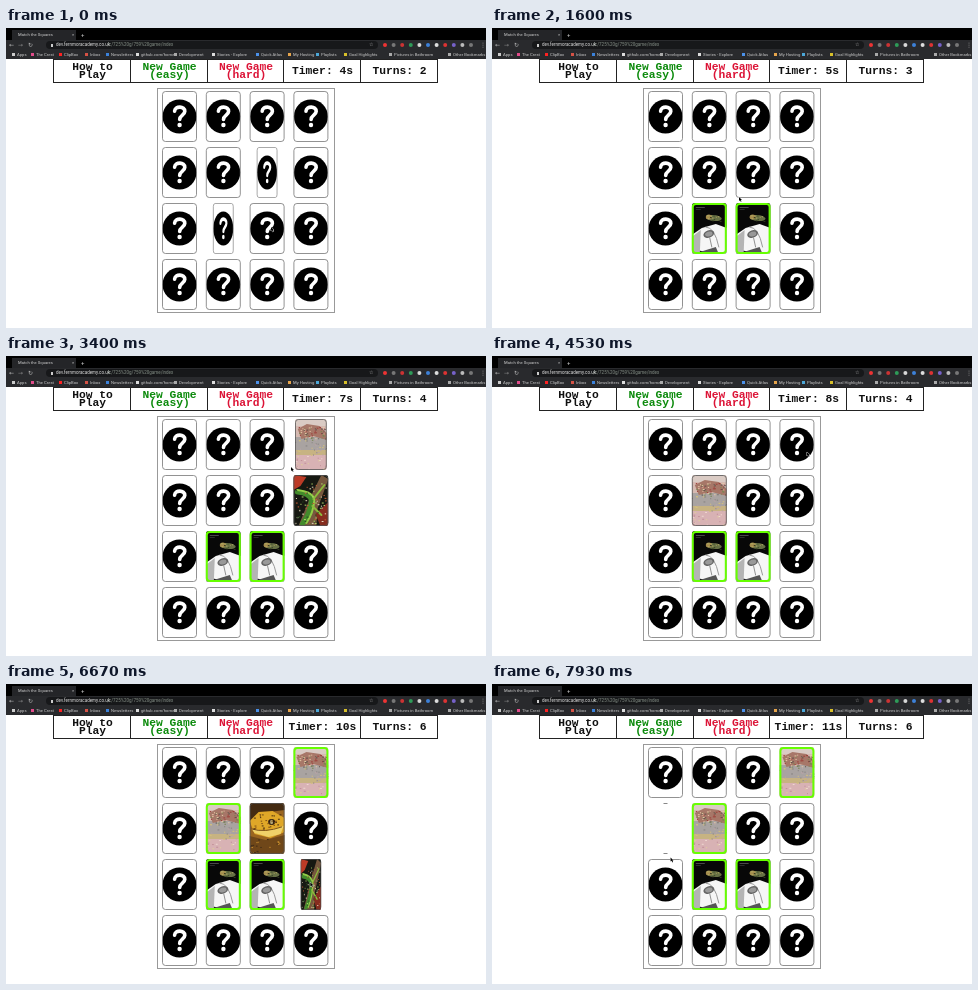
An HTML page with a canvas for the animation above (8 s loop, 480 by 300 pixels).

```html
<!DOCTYPE html>
<html lang="en">
<head>
<meta charset="utf-8">
<title>Match the Squares</title>
<style>
  html, body { margin: 0; width: 100%; height: 100%; overflow: hidden; background: #fff; }
  canvas { display: block; width: 480px; height: 300px; }
</style>
</head>
<body>
<canvas id="stage" width="480" height="300"></canvas>
<script>
const ctx = document.getElementById('stage').getContext('2d');
const LOOP = 8000, FLIP = 500;
const CARD_W = 35, CARD_H = 51;

// ---------- drawing helpers ----------
function rect(x, y, w, h, color) {
  ctx.fillStyle = color;
  ctx.fillRect(x, y, w, h);
}
function shape(color, ...points) {
  ctx.fillStyle = color;
  ctx.beginPath();
  points.forEach(([x, y]) => ctx.lineTo(x, y));
  ctx.fill();
}
function oval(x, y, rx, ry, color, turn = 0) {
  ctx.fillStyle = color;
  ctx.beginPath();
  ctx.ellipse(x, y, rx, ry, turn, 0, Math.PI * 2);
  ctx.fill();
}
function curve(color, width, path) {
  ctx.strokeStyle = color;
  ctx.lineWidth = width;
  ctx.lineCap = 'round';
  ctx.stroke(new Path2D(path));
}
function rounded(x, y, w, h, r) {
  ctx.beginPath();
  ctx.roundRect(x, y, w, h, r);
}
function text(string, x, y, font, color, align = 'left') {
  ctx.font = font;
  ctx.fillStyle = color;
  ctx.textAlign = align;
  ctx.textBaseline = 'middle';
  ctx.fillText(string, x, y);
}
function speckle(seed, count, x, y, w, h, colors) {
  const random = () => (seed = (seed * 16807) % 2147483647) / 2147483647;
  for (let i = 0; i < count; i++) {
    rect(x + random() * w, y + random() * h, 1 + random(), 1, colors[i % colors.length]);
  }
}

// ---------- card faces, in a 35 x 51 box ----------
const faces = {
  mono() {
    rect(0, 0, 35, 51, '#080808');
    shape('#f6f6f6', [0, 32], [10, 25], [24, 21], [35, 25], [35, 51], [24, 51], [0, 46]);
    shape('#b4b4b4', [0, 34], [9, 27], [8, 51], [0, 51]);
    shape('#555', [8, 49], [24, 44], [27, 51], [6, 51]);
    curve('#999', 1, 'M14 24Q23 24 27 44');
    oval(17, 31, 5.5, 3.7, '#666', -.3);
    oval(17, 31, 3.8, 2.3, '#999', -.3);
    curve('#777', .8, 'M18 35L20 44');
    oval(22, 15, 8, 3, '#667044', .1);
    oval(17, 14, 3, 2.5, '#a58b4c');
    speckle(8, 14, 15, 12, 14, 6, ['#b0aa65', '#333c20']);
    rect(4, 4, 9, .7, '#666');
    rect(4, 6, 5, .6, '#444');
  },
  sand() {
    rect(0, 0, 35, 51, '#d5b9b1');
    rect(0, 0, 35, 7, '#dacbc4');
    rect(0, 18, 35, 13, '#a9a3a1');
    rect(0, 31, 35, 5, '#c7b382');
    rect(0, 36, 35, 15, '#d8b2b4');
    shape('#a77768', [3, 10], [13, 5], [27, 7], [35, 14], [35, 21], [20, 17], [7, 20]);
    speckle(31, 60, 4, 7, 30, 14, ['#9d3d38', '#788652', '#e5c7a7', '#5c5148']);
    speckle(77, 36, 0, 21, 35, 15, ['#85817f', '#d4c07c', '#bba5a8']);
    speckle(19, 24, 0, 37, 35, 14, ['#efd8d0', '#c18e98', '#dfcc9c']);
  },
  branch() {
    rect(0, 0, 35, 51, '#171912');
    shape('#76583e', [5, 51], [17, 22], [28, 0], [35, 4], [24, 34], [23, 51]);
    shape('#bc3b26', [0, 0], [13, 2], [7, 11], [0, 15]);
    shape('#862d1f', [22, 39], [35, 27], [35, 51], [27, 51]);
    curve('#438b2c', 5, 'M4 17Q17 18 18 26Q17 38 9 49');
    curve('#91cd47', 2, 'M4 15Q20 17 21 25Q20 38 13 48');
    curve('#8bbb3b', 2, 'M20 24L31 10M19 31L28 40');
    speckle(53, 65, 2, 8, 31, 41, ['#e6d8bd', '#c45b32', '#294d20', '#afd469']);
  },
  gecko() {
    rect(0, 0, 35, 51, '#9a6520');
    shape('#442b12', [0, 0], [35, 0], [35, 7], [12, 10], [0, 21]);
    shape('#6f4719', [0, 33], [16, 37], [35, 32], [35, 51], [0, 51]);
    shape('#dfa728', [0, 18], [9, 9], [23, 8], [35, 15], [35, 29], [21, 35], [5, 31]);
    shape('#efd169', [2, 26], [17, 28], [34, 23], [31, 31], [19, 34], [5, 30]);
    oval(22, 19, 3.5, 3, '#31200f');
    oval(22, 19, 1.5, 2.2, '#b6a773');
    curve('#7b511b', 1, 'M2 26Q15 30 32 24');
    speckle(91, 30, 4, 10, 29, 16, ['#4a3010', '#7c4d16']);
    speckle(44, 25, 0, 36, 35, 15, ['#c28a2c', '#402b16']);
  }
};

function drawBack() {
  oval(17.5, 25.5, 17, 17, '#000');
  curve('#fff', 3.6, 'M12.6 20.2C13 14.6 23 14.8 22.8 20.4C22.7 24 17.7 24.2 17.7 28.4');
  oval(17.6, 34, 2.2, 2.2, '#fff');
}

// ---------- game script ----------
// Cards are numbered row by row; each flip is [time, face up].
const cards = {
  3: { face: 'sand', flips: [[3117, 1], [3985, 0], [4650, 1]], matched: 4950 },
  4: { face: 'branch', flips: [[7782, 1]] },
  5: { face: 'sand', flips: [[4040, 1]], matched: 4950 },
  6: { face: 'gecko', flips: [[-206, 0], [5224, 1], [7364, 0]] },
  7: { face: 'branch', flips: [[2300, 1], [3985, 0]] },
  9: { face: 'mono', flips: [[-206, 0], [1050, 1]], matched: 1350 },
  10: { face: 'mono', flips: [[450, 1]], matched: 1350 },
  11: { face: 'branch', flips: [[6464, 1], [7364, 0]] }
};
const turnTimes = [1050, 3117, 4650, 6464];
const pointer = [
  [0, 265, 199], [450, 262, 203], [1050, 224, 204], [1600, 247, 169], [2300, 304, 150],
  [3117, 303, 96], [3400, 285, 111], [4040, 222, 140], [4530, 315, 96], [4650, 310, 95],
  [5224, 265, 145], [5400, 271, 135], [6464, 305, 195], [7000, 303, 205],
  [7782, 174, 160], [8000, 180, 178]
];

// The CSS "ease" curve, cubic-bezier(.25, .1, .25, 1).
function ease(x) {
  if (x >= 1) return 1;
  let low = 0, high = 1, u;
  for (let i = 0; i < 20; i++) {
    u = (low + high) / 2;
    const at = .75 * u * (1 - u) ** 2 + .75 * u * u * (1 - u) + u ** 3;
    if (at < x) low = u; else high = u;
  }
  return .3 * u * (1 - u) ** 2 + 3 * u * u * (1 - u) + u ** 3;
}

function faceUpAmount(card, time) {
  const last = card?.flips.filter(([start]) => start <= time).pop();
  if (!last) return 0;
  const progress = ease((time - last[0]) / FLIP);
  return last[1] ? progress : 1 - progress;
}

function drawCard(index, time) {
  const card = cards[index];
  const up = faceUpAmount(card, time);
  const width = Math.abs(Math.cos(up * Math.PI));
  ctx.save();
  ctx.translate(173.5 + (index % 4) * 43.8, 63 + Math.floor(index / 4) * 56);
  if (width < .1) {
    // Edge on, only the two ends remain visible.
    rect(-2, 0, 4, 1, '#888');
    rect(-2, 50, 4, 1, '#888');
    ctx.restore();
    return;
  }
  ctx.scale(width, 1);
  ctx.translate(-CARD_W / 2, 0);
  ctx.save();
  rounded(0, 0, CARD_W, CARD_H, 3);
  ctx.clip();
  if (up > .5) faces[card.face](); else drawBack();
  ctx.restore();
  const matched = time >= card?.matched;
  const inset = matched ? 1 : .5;
  rounded(inset, inset, CARD_W - 2 * inset, CARD_H - 2 * inset, 3);
  ctx.strokeStyle = matched ? '#66ff00' : up > .5 ? '#555' : '#777';
  ctx.lineWidth = matched ? 2 : .8;
  ctx.stroke();
  ctx.restore();
}

// ---------- page ----------
const bookmarks = [
  [11, 'Apps', '#ccc'], [30, 'The Crest', '#e14b8a'], [58, 'ClipBox', '#f22'],
  [84, 'Inbox', '#d65245'], [105, 'Newsletters', '#3b82db'], [135, 'github.com/home', '#ddd'],
  [173, 'Development', '#aaa'], [211, 'Stories - Explore', '#ddd'], [255, 'Quick Atlas', '#4b91ea'],
  [287, 'My Hosting', '#e7a54b'], [315, 'Playlists', '#4ba7d8'], [343, 'Goal Highlights', '#d8c02a'],
  [388, 'Pictures in Bathroom', '#aaa'], [447, 'Other Bookmarks', '#aaa']
];
const extensions = ['#e33', '#777', '#c33', '#2e9b58', '#d8d8d8', '#3d81d8', '#ddd', '#d33', '#7661c9', '#bbb', '#777'];

function drawBrowser() {
  const small = '4.2px Roboto, sans-serif';
  rect(0, 0, 480, 31, '#000');
  rect(6, 2, 64, 11, '#242528');
  text('Match the Squares', 12, 7, small, '#ccc');
  text('×', 66, 7, small, '#ccc');
  text('+', 75, 7, '6px Roboto, sans-serif', '#ccc');
  rect(0, 12, 480, 19, '#292a2d');
  rounded(40, 13, 332, 8, 4);
  ctx.fillStyle = '#17181a';
  ctx.fill();
  text('←', 3, 17, '6px "DejaVu Sans", sans-serif', '#bbb');
  text('→', 12, 17, '6px "DejaVu Sans", sans-serif', '#888');
  text('↻', 22, 17, '6px "DejaVu Sans", sans-serif', '#bbb');
  rect(45, 16, 2, 3, '#ccc');
  text('dev.fernmoracademy.co.uk', 50, 17, '4.5px Roboto, sans-serif', '#e4e4e4');
  text('/c/725%20g/759%20game/index', 101, 17, '4.5px Roboto, sans-serif', '#869087');
  text('☆', 363, 17, '5px "DejaVu Sans", sans-serif', '#ccc');
  extensions.forEach((color, i) => oval(379 + i * 8.6, 17, 2, 2, color));
  text('⋮', 474, 17, '6px "DejaVu Sans", sans-serif', '#ccc');
  bookmarks.forEach(([x, label, color]) => {
    rect(x - 5, 25, 3, 3, color);
    text(label, x, 26.7, small, '#ccc');
  });
}

function drawHeader(time) {
  const font = 'bold 11.3px "Liberation Mono", monospace';
  const seconds = 4 + Math.max(0, Math.floor((time - 850) / 1030) + 1);
  const turns = 2 + turnTimes.filter(start => start <= time).length;
  const cells = [
    [['How to', 'Play'], '#111'], [['New Game', '(easy)'], '#0b8a0b'],
    [['New Game', '(hard)'], '#dc1437'], [[`Timer: ${seconds}s`], '#111'],
    [[`Turns: ${turns}`], '#111']
  ];
  ctx.strokeStyle = '#222';
  ctx.lineWidth = 1;
  cells.forEach(([lines, color], i) => {
    const left = Math.round(48 + i * 76.8), right = Math.round(124.8 + i * 76.8);
    ctx.strokeRect(left - .5, 31.5, right - left, 23);
    lines.forEach((line, row) =>
      text(line, (left + right) / 2, lines.length > 1 ? 39 + row * 8 : 43, font, color, 'center'));
  });
}

function drawPointer(time) {
  const next = Math.max(1, pointer.findIndex(([at]) => at > time));
  const [t0, x0, y0] = pointer[next - 1], [t1, x1, y1] = pointer[next];
  const part = (time - t0) / (t1 - t0);
  const smooth = part * part * (3 - 2 * part);
  ctx.save();
  ctx.translate(x0 + (x1 - x0) * smooth, y0 + (y1 - y0) * smooth);
  const arrow = new Path2D('M0 0V4L1 3.2L1.8 4.8L2.5 4.4L1.8 2.9H3Z');
  ctx.strokeStyle = '#fff';
  ctx.lineWidth = .8;
  ctx.stroke(arrow);
  ctx.fillStyle = '#000';
  ctx.fill(arrow);
  ctx.restore();
}

function draw(now) {
  const time = now % LOOP;
  rect(0, 0, 480, 300, '#fff');
  drawBrowser();
  drawHeader(time);
  ctx.strokeStyle = '#999';
  ctx.lineWidth = 1;
  ctx.strokeRect(151.5, 60.5, 177, 224);
  for (let i = 0; i < 16; i++) drawCard(i, time);
  drawPointer(time);
}

let start;
function tick(now) {
  start ??= now;
  draw(now - start);
  requestAnimationFrame(tick);
}
requestAnimationFrame(tick);
</script>
</body>
</html>
```
